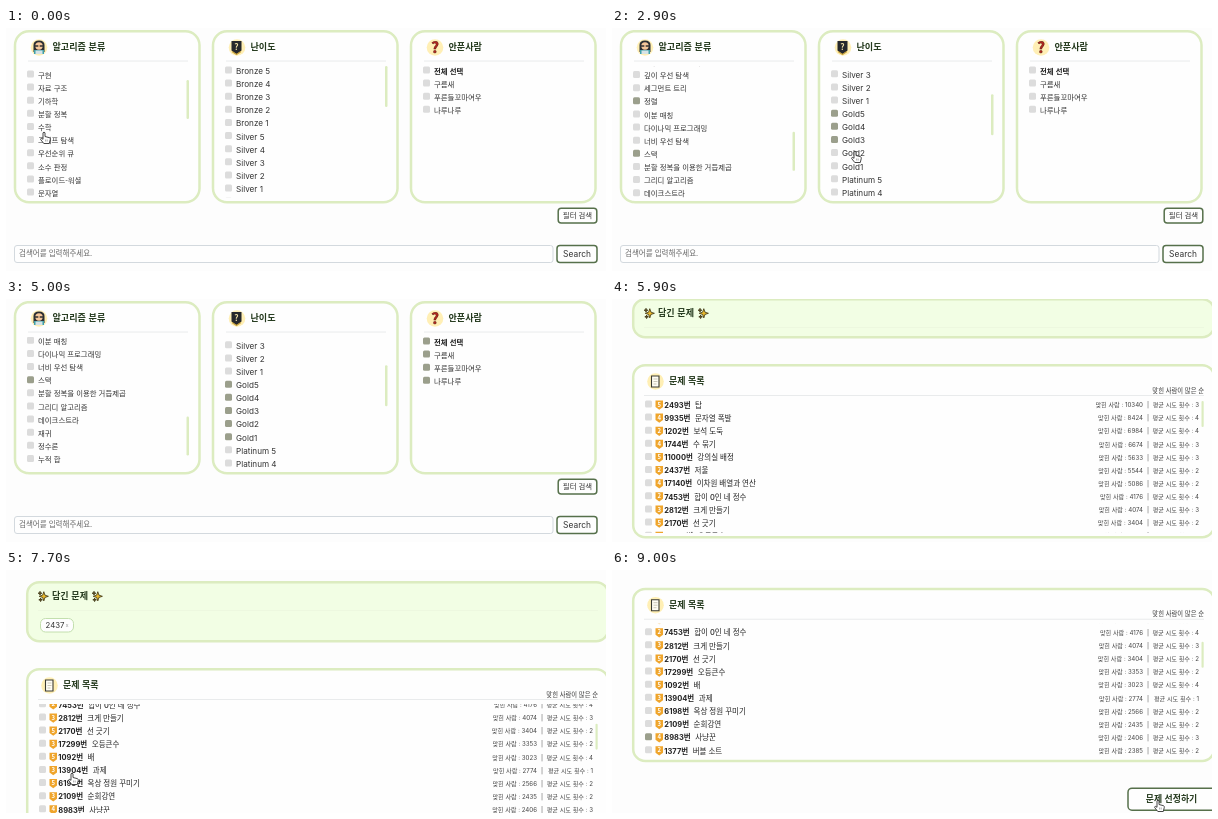
Recreate the animation shown at these times as an HTML page. Size 600x243 px, loop 9100 ms.

```html
<!DOCTYPE html>
<html lang="ko">
<head>
<meta charset="utf-8">
<style>
html, body { margin: 0; width: 100%; height: 100%; overflow: hidden; background: #fdfdfd; }
svg { display: block; width: 100vw; height: 100vh; }
text { font-family: 'Noto Sans CJK KR', 'Noto Sans CJK', sans-serif; font-weight: 500; fill: #333; white-space: pre; }
.en, .num, .stat { font-family: Inter, 'Noto Sans CJK KR', 'Noto Sans CJK', sans-serif; }
.en { font-weight: 400; }
.num { font-weight: 700; fill: #222; }
.stat { font-weight: 400; fill: #444; }
.b { font-weight: 700; fill: #222; }
.h { font-weight: 700; fill: #253a1e; }
.panel { fill: #fefefe; stroke: #dcecc0; stroke-width: 2.5; }
.rule { stroke: #e9ebec; stroke-width: 1; }
.bar { fill: #dcecc0; }
.box { fill: #dcdcdc; }
.box.on { fill: #9b9f8c; }
.btn { fill: #fefefe; stroke: #56704b; stroke-width: 1.5; }
</style>
</head>
<body>
<svg id="stage" viewBox="0 0 600 243"></svg>
<script>
const LOOP = 9100, PITCH = 13.12;

const rect = (x, y, w, h, r, cls, extra = '') =>
  `<rect x="${x}" y="${y}" width="${w}" height="${h}" rx="${r}" class="${cls}" ${extra}/>`;
// y is the vertical middle of the line
const text = (x, y, size, s, cls = '', anchor = 'start', fill = '') =>
  `<text x="${x}" y="${y + size * 0.36}" font-size="${size}" class="${cls}" text-anchor="${anchor}"` +
  `${fill && ` style="fill:${fill}"`}>${s}</text>`;
const rule = (x1, x2, y) => `<path class="rule" d="M${x1} ${y}H${x2}"/>`;
const halo = (x, y) => `<circle cx="${x}" cy="${y}" r="8.3" fill="#ffefb5"/>`;
const clip = (id, x, y, w, h) => `<clipPath id="${id}"><rect x="${x}" y="${y}" width="${w}" height="${h}"/></clipPath>`;
const levels = (name, gap = ' ') => [5, 4, 3, 2, 1].map(n => name + gap + n);

const topics = ['구현', '자료 구조', '기하학', '분할 정복', '수학', '그래프 탐색', '우선순위 큐', '소수 판정',
  '플로이드-워셜', '문자열', '트리', '이분 탐색', '브루트포스 알고리즘', '깊이 우선 탐색', '세그먼트 트리', '정렬',
  '이분 매칭', '다이나믹 프로그래밍', '너비 우선 탐색', '스택', '분할 정복을 이용한 거듭제곱', '그리디 알고리즘',
  '데이크스트라', '재귀', '정수론', '누적 합'];
const tiers = [...levels('Bronze'), ...levels('Silver'), ...levels('Gold', ''), ...levels('Platinum')];
const people = ['전체 선택', '구름새', '푸른들꼬마여우', '나루나루'];

// number, title, solvers, average tries, tier
const problems = [
  [2493, '탑', 10340, 3, 5], [9935, '문자열 폭발', 8424, 4, 4], [1202, '보석 도둑', 6984, 4, 2],
  [1744, '수 묶기', 6674, 3, 4], [11000, '강의실 배정', 5633, 3, 5], [2437, '저울', 5544, 2, 2],
  [17140, '이차원 배열과 연산', 5086, 2, 4], [7453, '합이 0인 네 정수', 4176, 4, 2], [2812, '크게 만들기', 4074, 3, 3],
  [2170, '선 긋기', 3404, 2, 5], [17299, '오등큰수', 3353, 2, 3], [1092, '배', 3023, 4, 5],
  [13904, '과제', 2774, 1, 3], [6198, '옥상 정원 꾸미기', 2566, 2, 5], [2109, '순회강연', 2435, 2, 3],
  [8983, '사냥꾼', 2406, 3, 4], [1377, '버블 소트', 2385, 2, 2]];

// when each checkbox is ticked
const ticks = { t15: 1100, t19: 1650, g10: 2400, g11: 2600, g12: 2800, g13: 3000, g14: 3200,
  p0: 3700, p1: 3700, p2: 3700, p3: 3700, q5: 7200, q15: 8500 };

const checkbox = (id, x, y) => rect(x, y - 4.5, 7, 7, 1.5, 'box', `id="${id}"`);

function filterPanel(key, x, title, items, first, icon) {
  const rows = items.map((s, i) => {
    const y = first + i * PITCH;
    const en = key === 'g', bold = key === 'p' && i === 0;
    return checkbox(key + i, x + 12, y) + text(x + 23, y, en ? 8.15 : 7.4, s, en ? 'en' : bold ? 'b' : '');
  }).join('');
  return rect(x, 3.2, 184.5, 171, 14, 'panel') + halo(x + 24, 19.5) + icon +
    text(x + 37.5, 18.5, 9.1, title, 'h') + rule(x + 13, x + 173, 33) +
    clip('clip-' + key, x, 38, 184, 132) +
    `<g clip-path="url(#clip-${key})"><g id="list-${key}">${rows}</g></g>`;
}

const coder = `<path d="M27.5 24V17q0-4.5 5.5-4.5t5.5 4.5V24Z" fill="#2b2e33"/>
  <circle cx="33" cy="18" r="3.7" fill="#f4c69a"/><path d="M29 18h3.3m1.4 0h3.3" stroke="#333" stroke-width="1.6"/>
  <path d="M28 26v-4h10v4Z" fill="#3fa0a8"/><path d="M29.5 22.5h7v3.5h-7Z" fill="#d6e3e6"/>`;
const shield = `<path d="M225.5 13h10v9.5l-5 4-5-4Z" fill="#26282c"/>
  <path d="M226 23.5l4.5 3 4.5-3" fill="none" stroke="#c9a23c" stroke-width="1.2"/>` +
  text(230.5, 18.5, 8.5, '?', 'b', 'middle', '#f3e3a8');
const question = `<g stroke="#5a1712" stroke-width=".5">${text(429, 19.5, 15, '?', 'b', 'middle', '#b3261e')}</g>`;

const star = (x, y, r, fill) => {
  const k = r * 0.25, d = r - k;
  return `<path d="M${x} ${y - r}l${k} ${d} ${d} ${k} ${-d} ${k} ${-k} ${d} ${-k} ${-d} ${-d} ${-k} ${d} ${-k}Z"
    fill="${fill}" stroke="#3a3212" stroke-width=".8"/>`;
};
const sparkles = x => star(x + 0.8, 14.3, 4.6, '#e8b82c') + star(x - 3, 11.2, 1.9, '#5d4f1a') + star(x - 2.4, 17.8, 1.8, '#5d4f1a');

const problemRow = ([num, title, solvers, tries, tier], i) => {
  const y = 40 + i * PITCH;
  return checkbox('q' + i, 33, y) +
    `<path d="M43.5 ${y - 4.5}h7.5v6.5l-3.75 2.7-3.75-2.7Z" fill="#efa52c"/>` +
    text(47.2, y - 0.6, 6, tier, 'b', 'middle', '#fff') +
    text(52.3, y, 7.5, `${num}번<tspan dx="4.5" font-weight="500">${title}</tspan>`, 'num') +
    text(531, y, 6.15, `맞힌 사람 : ${solvers}`, 'stat', 'end') + text(536, y, 6.15, '|', 'stat', 'middle') +
    text(587, y, 6.15, `평균 시도 횟수 : ${tries}`, 'stat', 'end');
};

const notebook = `<path d="M39.5 11h7.5v11h-7.5Z" fill="#fffdf4" stroke="#3a3a32" stroke-width="1.1"/>
  <path d="M41.5 14h4m-4 2.5h4m-4 2.5h3" stroke="#b5b0a0" stroke-width=".7"/>`;

const filters =
  filterPanel('t', 9, '알고리즘 분류', topics, 47, coder) + rect(180.5, 52, 2.5, 39, 1.2, 'bar', 'id="bar-t"') +
  filterPanel('g', 207, '난이도', tiers, 43, shield) + rect(379, 38, 2.5, 41, 1.2, 'bar', 'id="bar-g"') +
  filterPanel('p', 405, '안푼사람', people, 43, question) +
  rect(552.2, 180.3, 38.6, 14.6, 3, 'btn') + text(571.5, 187.5, 7.4, '필터 검색', '', 'middle') +
  rect(8.5, 217.5, 538.5, 17, 2.5, '', 'fill="#fefefe" stroke="#d3d9de"') +
  text(13, 225.5, 7.5, '검색어를 입력해주세요.', '', 'start', '#666') +
  rect(551, 217.5, 40, 17, 3, 'btn') + text(571, 225.5, 8.4, 'Search', 'en', 'middle');

const basket = `<g transform="translate(0 262)">
  ${rect(21.2, 0.2, 581, 38, 12, 'panel', 'id="basket" style="fill:#f2fee4"')}
  ${sparkles(37)}${text(46, 14, 9.1, '담긴 문제', 'h')}${sparkles(91)}
  <path d="M32 28.5H592" stroke="#edf8df"/>
  <g id="chip">${rect(34.5, 36.5, 33, 13.5, 5, '', 'fill="#fefefe" stroke="#c3dfae"')}
  ${text(39.5, 43, 7.8, '2437', 'en')}${text(59.8, 43, 5.5, 'x', '', 'start', '#999')}</g></g>`;

const results = `<g id="results">${rect(21.2, 0.2, 581, 172, 12, 'panel')}
  ${halo(43.5, 16.5)}${notebook}${text(57, 16, 9, '문제 목록', 'h')}
  ${text(592, 25.5, 6.3, '맞힌 사람이 많은 순', '', 'end')}${rule(32, 592, 30.5)}
  ${clip('clip-q', 21, 35, 579, 133)}
  <g clip-path="url(#clip-q)"><g id="list-q">${problems.map(problemRow).join('')}</g></g>
  ${rect(589.5, 36, 2.2, 26, 1.1, 'bar', 'id="bar-q"')}
  ${rect(516, 199.5, 88, 22, 4, 'btn')}${text(559.5, 210.5, 8.9, '문제 선정하기', 'h', 'middle')}</g>`;

const hand = `<g id="hand"><path d="M-1 .8Q0-.6 1 .8V4.5l4.5 1.2q1 .4.8 1.6L5.3 11.5H-.2L-3.3 7.6q-.2-1.3 1-1.2L-1 7.3Z"
  fill="#fff" stroke="#333" stroke-width=".9" stroke-linejoin="round"/><path d="M1.6 7.5v2m1.6-2v2" stroke="#555" stroke-width=".5"/></g>`;

document.getElementById('stage').innerHTML =
  `<rect width="600" height="243" fill="#fdfdfd"/><g id="page">${filters}${basket}${results}</g>${hand}`;

const $ = id => document.getElementById(id);
const move = (id, x, y) => $(id).setAttribute('transform', `translate(${x} ${y})`);

// eased value along [time, value] stops
function track(t, stops) {
  let [t0, v0] = stops[0];
  for (const [t1, v1] of stops) {
    if (t < t1) {
      const u = Math.max(0, (t - t0) / (t1 - t0));
      return v0 + (v1 - v0) * u * u * (3 - 2 * u);
    }
    [t0, v0] = [t1, v1];
  }
  return v0;
}

const scrolls = {
  t: [[300, 0], [900, 127], [1300, 127], [1600, 170], [4450, 170], [4900, 214.6]],
  g: [[1900, 0], [2200, 88]],
  q: [[7350, 0], [7650, 96], [8050, 96], [8300, 87.8]],
};
const barRate = { t: 0.305, g: 0.32, q: 0.195 };
const pageScroll = [[5350, 0], [5900, 262], [6100, 262], [6500, 250], [8050, 250], [8400, 330.3]];
const path = [[0, 38, 104], [800, 38, 104], [1050, 39, 117], [1300, 39, 117], [1600, 37, 125], [1700, 37, 125],
  [1900, 238, 88], [2300, 238, 85], [2450, 239, 85], [2600, 240, 98], [2780, 241, 111], [2900, 243, 123],
  [3020, 243, 123], [3180, 243, 137], [3300, 243, 137], [3600, 436, 42], [3800, 436, 42], [4200, 557, 180],
  [6100, 110, 190], [6700, 72, 167], [7000, 72, 167], [7150, 60, 183], [7300, 60, 183], [7600, 66, 203],
  [8100, 66, 203], [8450, 62, 167], [8550, 62, 167], [8880, 546, 230]];
const pathX = path.map(p => [p[0], p[1]]), pathY = path.map(p => [p[0], p[2]]);

function draw(t) {
  for (const key in scrolls) {
    const s = track(t, scrolls[key]);
    move('list-' + key, 0, -s);
    move('bar-' + key, 0, s * barRate[key]);
  }
  for (const id in ticks) $(id).classList.toggle('on', t >= ticks[id]);
  const picked = t >= ticks.q5;
  $('chip').style.display = picked ? '' : 'none';
  $('basket').setAttribute('height', picked ? 59 : 38);
  move('results', 0, picked ? 349 : 328);
  move('page', 0, -track(t, pageScroll));
  $('hand').style.display = t >= 4300 && t < 6100 ? 'none' : '';
  move('hand', track(t, pathX), track(t, pathY));
}

const start = performance.now();
function loop() {
  draw((performance.now() - start) % LOOP);
  requestAnimationFrame(loop);
}
draw(0);
requestAnimationFrame(loop);
</script>
</body>
</html>
```
